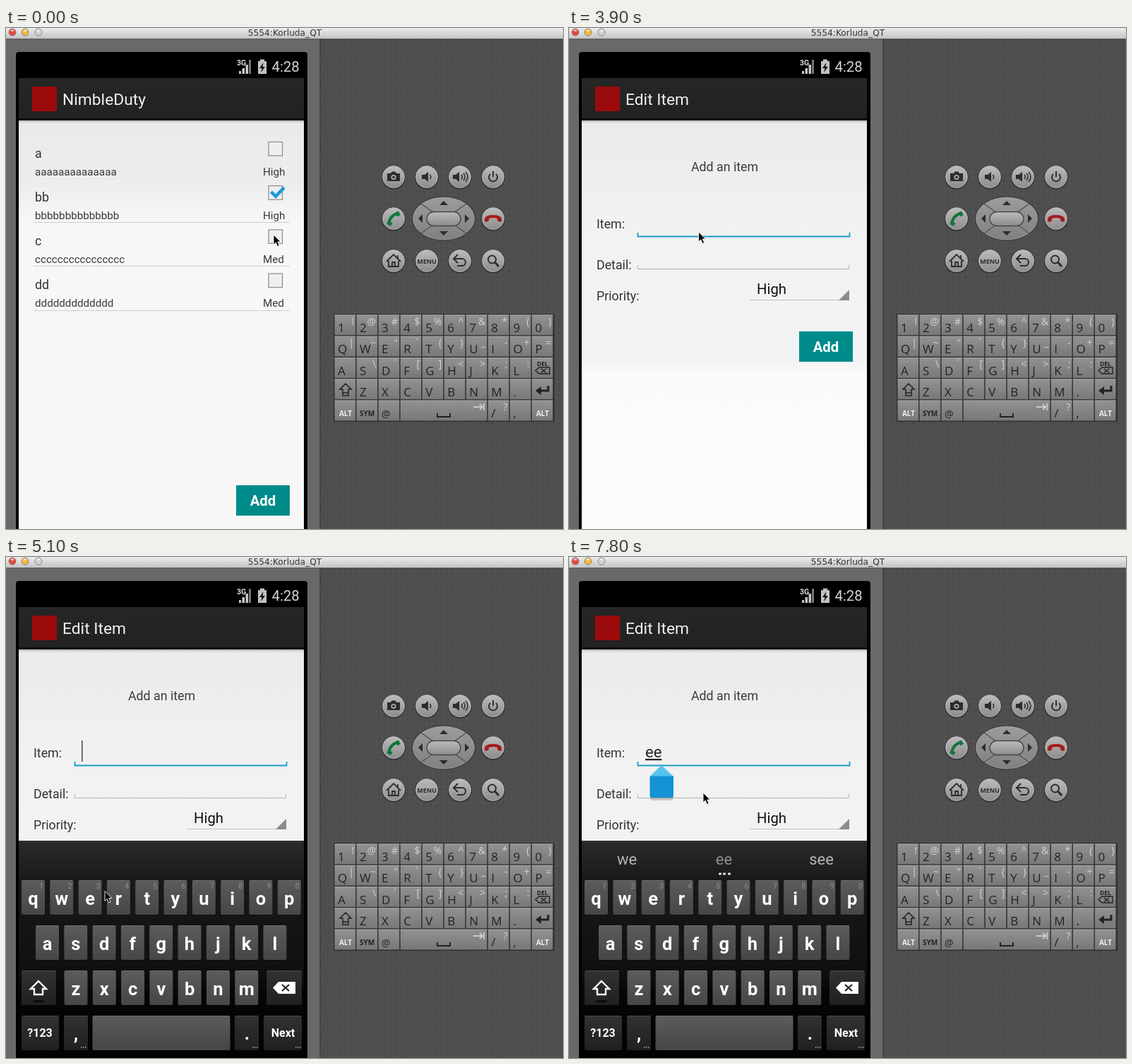
These frames come from a looping animation (789 by 710 pixels, 8000 ms). An HTML page:

```html
<!DOCTYPE html>
<html lang="en">
<head>
<meta charset="utf-8">
<title>To-do app in an emulator</title>
<style>
html, body { margin: 0; width: 100%; height: 100%; overflow: hidden; background: #4e4e4e; }
svg { display: block; width: 789px; height: 710px; font-family: Roboto, sans-serif; }
text { white-space: pre; }
</style>
</head>
<body>
<svg id="stage" viewBox="0 0 789 710" xmlns="http://www.w3.org/2000/svg"></svg>
<script>
const LOOP = 8000, STEP = 150;

// Drawing helpers
const rect = (x, y, w, h, fill, more = '') =>
  `<rect x="${x}" y="${y}" width="${w}" height="${h}" fill="${fill}" ${more}/>`;
const path = (d, fill, more = '') => `<path d="${d}" fill="${fill}" ${more}/>`;
const line = (d, color, w = 1, more = '') =>
  path(d, 'none', `stroke="${color}" stroke-width="${w}" ${more}`);
const circle = (x, y, r, fill, more = '') =>
  `<circle cx="${x}" cy="${y}" r="${r}" fill="${fill}" ${more}/>`;
const text = (x, y, s, size, fill, more = '') =>
  `<text x="${x}" y="${y}" font-size="${size}" fill="${fill}" ${more}>${s.replace(/&/g, '&amp;').replace(/</g, '&lt;')}</text>`;
const group = (id, body, more = '') => `<g id="${id}" ${more}>${body}</g>`;
const at = (x, y, body) => `<g transform="translate(${x} ${y})">${body}</g>`;
const gradient = (id, ...stops) =>
  `<linearGradient id="${id}" x2="0" y2="1">${stops.map(([o, c]) =>
    `<stop offset="${o}" stop-color="${c}"/>`).join('')}</linearGradient>`;
const MID = 'text-anchor="middle"';
const BOLD = 'font-weight="700"';
const SANS = 'font-family="Open Sans, sans-serif"';

const defs = `<defs>
  ${gradient('titleFill', [0, '#ececec'], [1, '#c4c4c4'])}
  ${gradient('barFill', [0, '#262626'], [1, '#222'])}
  ${gradient('listFill', [0, '#eaeaea'], [.16, '#ededed'], [.22, '#f5f5f5'], [.26, '#f7f7f7'], [1, '#f7f7f7'])}
  ${gradient('formFill', [0, '#ebebeb'], [.16, '#eee'], [.21, '#f1f1f1'], [.59, '#f3f3f3'], [.62, '#fafafa'], [1, '#fcfcfc'])}
  ${gradient('shadeFill', [0, '#bbb'], [1, '#ebebeb'])}
  ${gradient('boardFill', [0, '#2b2b2b'], [.17, '#181818'], [.5, '#111'], [.62, '#060606'], [1, '#000'])}
  ${gradient('keyFill', [0, '#5c5c5c'], [1, '#464646'])}
  ${gradient('darkKeyFill', [0, '#323232'], [1, '#202020'])}
  ${gradient('litKeyFill', [0, '#7a7a7a'], [1, '#9a9a9a'])}
  ${gradient('popupFill', [0, '#888'], [1, '#717171'])}
  ${gradient('knobFill', [0, '#bcbcbc'], [1, '#8c8c8c'])}
  ${gradient('padFill', [0, '#9c9c9c'], [1, '#808080'])}
  ${gradient('hardKeyFill', [0, '#929292'], [1, '#787878'])}
  <pattern id="weave" width="8" height="8" patternUnits="userSpaceOnUse">
    ${rect(0, 0, 8, 8, '#4f4f4f')}${line('M0 .5H8M.5 0V8', '#4b4b4b')}${line('M4.5 0V8M0 4.5H8', '#515151')}
  </pattern>
  <clipPath id="screen"><rect x="18" y="71" width="404" height="639"/></clipPath>
</defs>`;

function desktop() {
  const lights = [['#e8473c', 9], ['#f3b73c', 27], ['#d2d2d2', 46]].map(([c, x]) =>
    circle(x, 6, 5, c, 'stroke="#777" stroke-width=".8"') +
    `<ellipse cx="${x}" cy="3.6" rx="2.6" ry="1.5" fill="#fff" opacity=".6"/>`).join('');
  return rect(0, 0, 789, 710, '#696969') + rect(445, 15, 344, 695, 'url(#weave)') +
    rect(444, 15, 2, 695, '#444') +
    rect(0, 0, 789, 15, 'url(#titleFill)') + rect(0, 15, 789, 1, '#5a5a5a') + lights +
    text(395, 10.5, '5554:Korluda_QT', 12.2, '#333', `${MID} font-family="DejaVu Sans, sans-serif"`);
}

function phone() {
  return path('M14 710V38q0-4 4-4H423q4 0 4 4V710Z', '#000') +
    text(327, 53, '3G', 10.5, '#ddd', BOLD) +
    path('M330 65V61H333V65ZM334.5 65V57H338V65ZM339.5 65V52H343V65Z', '#c8c8c8') +
    path('M344 65V45H347V65Z', '#777') +
    path('M357 47H360V44.5H366V47H369V65H357Z', '#c2c2c2') +
    path('M364.5 49L359 57H362.5L361 63L367 55H363.5Z', '#111') +
    text(376.5, 62, '4:28', 20.3, '#d6d6d6');
}

const actionBar = title =>
  rect(18, 71, 404, 60, 'url(#barFill)') + rect(18, 128, 404, 3, '#0d0d0d') + rect(18, 131, 404, 4, 'url(#shadeFill)') +
  rect(37, 83, 35, 35, '#9c0b0b') + text(80, 109, title, 22.8, '#f0f0f0');

const addButton = y => rect(326, y, 76, 43, '#008b8b') +
  text(364, y + 29, 'Add', 20.3, '#fff', `${MID} ${BOLD}`);

function listScreen() {
  const check = y => line(`M375.5 ${y + 9}L382 ${y + 15.5}L394 ${y + 3}`, '#1f9cd6', 4.6);
  const rows = [['a', 14, 'High'], ['bb', 14, 'High'], ['c', 16, 'Med'], ['dd', 13, 'Med']];
  const body = rows.map(([name, n, level], i) => {
    const y = 161 + i * 62.2;
    const mark = i == 1 ? check(y) : i == 2 ? group('check', check(y)) : '';
    return text(41, y + 22.5, name, 17.8, '#333') + text(41, y + 47.5, name[0].repeat(n), 15.2, '#3a3a3a') +
      text(364, y + 47.5, level, 15.2, '#3a3a3a') +
      (i == 2 ? rect(362, 276, 40, 40, '#33b5e5', 'id="press" rx="2" opacity=".35"') : '') +
      rect(372, y + .5, 19.5, 19.5, '#efefef', 'stroke="#8a8a8a" stroke-width="1.2"') + mark +
      (i ? rect(39, Math.round(y + 52), 363, 1, '#cfcfcf') : '');
  }).join('');
  return rect(18, 131, 404, 579, 'url(#listFill)') + actionBar('NimbleDuty') + body + addButton(648);
}

function formScreen() {
  return rect(18, 131, 404, 579, 'url(#formFill)') + actionBar('Edit Item') +
    text(220.5, 203, 'Add an item', 17.8, '#3a3a3a', MID) +
    text(39, 284, 'Item:', 17.8, '#333') + text(39, 342, 'Detail:', 17.8, '#333') +
    text(39, 386, 'Priority:', 17.8, '#333') +
    line('M97.5 290V295.5H397.5V290', '#1b9ccb', 1.8) +
    line('M97.5 336V341.5H396.5V336', '#b4b4b4') +
    text(266, 377, 'High', 20.3, '#111') + rect(256, 385, 141, 1, '#c0c0c0') +
    path('M397 371V386H382Z', '#8c8c8c') + addButton(430) +
    text(108, 284, '', 22, '#222', 'id="typed" text-decoration="underline"') +
    rect(107, 260, 1.5, 30, '#444', 'id="caret"') +
    group('handle', path('M131 295L147.5 311V340q0 3-3 3H118q-3 0-3-3V311Z', '#000', 'opacity=".18" transform="translate(0 2)"') +
      path('M131 295L148 311H114.5Z', '#56c5ee') +
      path('M114.5 310.5H148V338q0 3-3 3H117.5q-3 0-3-3Z', '#1592d5'));
}

const CAP = 33, PITCH = 40.3;

function softKeyboard() {
  const cap = (x, y, w, fill) => rect(x, y + 1, w, 49, '#000', 'rx="2" opacity=".6"') +
    rect(x, y, w, 49, `url(#${fill})`, 'rx="2"') + rect(x + 1, y, w - 2, 1, '#fff', 'opacity=".13"');
  const row = (letters, x, y) => [...letters].map((c, i) => {
    const kx = x + i * PITCH;
    return cap(kx, y, CAP, 'keyFill') + (c == 'e' ? group('lit', cap(kx, y, CAP, 'litKeyFill')) : '') +
      (y < 500 ? text(kx + 31, y + 11.5, `${(i + 1) % 10}`, 10.5, '#909090', 'text-anchor="end"') : '') +
      text(kx + CAP / 2, y + 35, c, 25.5, '#fff', `${MID} ${BOLD}`);
  }).join('');
  const more = (x, y) => [0, 3, 6].map(d => rect(x + d, y, 1.5, 1.5, '#aaa')).join('');
  const label = (x, y, s, size) => text(x, y, s, size, '#fff', `${MID} ${BOLD}`);
  const words = [82, 219.5, 357.5].map((x, i) =>
    text(x, 436, '', 22, i == 1 ? '#8f8f8f' : '#b5b5b5', `class="word" ${MID}`)).join('');
  return rect(18, 402, 404, 350, 'url(#boardFill)') + rect(18, 402, 404, 1, '#3a3a3a') +
    group('words', words + [212, 218, 225].map(x => rect(x, 447.5, 4, 3, '#e4e4e4', 'rx="1"')).join('')) +
    row('qwertyuiop', 22, 458) + row('asdfghjkl', 42, 522) +
    cap(22, 586, 49, 'darkKeyFill') + row('zxcvbnm', 82.5, 586) + cap(369, 586, 50, 'darkKeyFill') +
    line('M46 601L57 612H52V620H40V612H35Z', '#fff', 2.4) + rect(39, 628, 15, 3, '#0a0a0a') +
    path('M378 610.5L386 602H410V619H386Z', '#fff') + line('M391 606L401 615M401 606L391 615', '#222', 2.2) +
    cap(22, 650, 53, 'darkKeyFill') + cap(82, 650, 34, 'darkKeyFill') + cap(122.5, 650, 195, 'keyFill') +
    cap(324, 650, 34, 'darkKeyFill') + cap(365, 650, 54, 'darkKeyFill') +
    label(48, 680, '?123', 16) + label(99, 684, ',', 25) + label(341.5, 684, '.', 25) + label(392.5, 680, 'Next', 16) +
    more(106, 694) + more(349, 694) + more(410, 694) +
    group('popup', path('M92 370H147q3 0 3 3V441q0 3-3 5L125 459q-5 3-10 0L92 446q-3-2-3-5V373q0-3 3-3Z', 'url(#popupFill)', 'stroke="#666" stroke-width=".8"') +
      label(119.5, 419, 'e', 35) + [132, 138, 144].map(x => rect(x, 437.5, 2, 2, '#ccc')).join(''));
}

function hardButtons() {
  const ink = '#2c2c2c';
  const horn = path('M-7-3H-3L2-7V7L-3 3H-7Z', ink);
  const icons = [
    [549, 211, path('M-9-5H-4L-2.5-7.5H2.5L4-5H9V6H-9Z', ink) + circle(0, .5, 3.6, '#aaa') + circle(0, .5, 1.8, ink)],
    [596, 211, horn + line('M4.5-3q2.5 3 0 6', ink, 1.5)],
    [643, 211, at(-3, 0, horn) + line('M2-3q2.5 3 0 6M5-5q4 5 0 10M8-7q6 7 0 14', ink, 1.5)],
    [690, 211, line('M-4-4A6 6 0 1 0 4-4M0-8V0', ink, 2)],
    [549, 270, line('M-7 9Q-6-5 8-8', '#12763a', 4) + line('M-8 5L-3 9M4-9L8-4', '#12763a', 5)],
    [690, 270, path('M-12 4V0Q-10-5 0-5T12 0V4Q9 6 6 3V0Q0-2-6 0V3Q-9 6-12 4Z', '#a61b1b')],
    [549, 330, line('M-10 1L0-9L10 1M-7 0V8H7V0M-2 8V2H2V8M6-8V-4', ink, 1.8)],
    [596, 330, text(0, 3.6, 'MENU', 9, ink, `${MID} ${BOLD} ${SANS}`)],
    [643, 330, line('M-8-3H3a5 5 0 0 1 0 10H-4M-3-9L-9-3L-3 3', ink, 2)],
    [690, 330, circle(-1.5, -2, 5.5, 'none', `stroke="${ink}" stroke-width="2"`) + line('M2.5 2L8 8', ink, 3)]
  ];
  const pad = `<ellipse cx="620" cy="270" rx="45" ry="31.5" fill="#333"/>
    <ellipse cx="620" cy="270" rx="43.5" ry="30" fill="url(#padFill)" stroke="#aaa" stroke-width=".8"/>` +
    line('M588 249L606 262M652 249L634 262M588 291L606 278M652 291L634 278', '#555', 1.5) +
    rect(596, 260.5, 48, 20, 'url(#knobFill)', 'rx="10" stroke="#444" stroke-width="1.3"') +
    path('M614 251L620 245L626 251ZM614 288L620 294L626 288ZM590 264V276L584 270ZM650 264V276L656 270Z', ink);
  return pad + icons.map(([x, y, icon]) => at(x, y,
    circle(0, .8, 17, '#353535') + circle(0, 0, 15.5, 'url(#knobFill)', 'stroke="#cacaca" stroke-width=".7"') + icon)).join('');
}

function hardKeyboard() {
  const rows = ['1234567890', 'QWERTYUIOP', 'ASDFGHJKL ', ' ZXCVBNM. ', '  @    /, '];
  const alts = ['!@#$%^&*()', '|~"`{}_-+=', ' \\\u00b4[]<>;: ', '', '       ?  '];
  const W = 31.05, H = 30.3, ink = '#222';
  let out = rect(464, 405, 313, 153, '#303030');
  rows.forEach((r, j) => [...r].forEach((c, i) => {
    if (j == 4 && i > 3 && i < 7) return;
    const x = 465.5 + i * W, y = 406.5 + j * H, w = (j == 4 && i == 3 ? 4 : 1) * W - 1.5;
    out += rect(x, y, w, H - 1.5, 'url(#hardKeyFill)') + rect(x, y, w, 1, '#aaa') +
      text(x + 4.5, y + 24.5, c, c == '@' ? 14 : 17, ink, SANS) +
      text(x + 27.5, y + 14, alts[j][i] || '', 14, '#d2d2d2', `text-anchor="end" ${SANS}`);
  }));
  const small = (x, y, s, fill, size) => text(x, y, s, size, fill, `${MID} ${BOLD} ${SANS}`);
  return out + small(760, 479, 'DEL', ink, 8.5) + small(481, 550, 'ALT', '#eee', 10) +
    small(511.5, 550, 'SYM', ink, 10) + small(760, 550, 'ALT', '#eee', 10) +
    line('M750 485.5L755 481H770V490H755ZM758 483L765 488.5M765 483L758 488.5', ink, 1.4) +
    line('M481 504L489 512H485V521H477V512H473ZM477 517H485', ink, 1.5) +
    line('M768 507V514H754', ink, 3) + path('M750 514L758 508V520Z', ink) +
    line('M611 546V551H629V546', ink, 2) + line('M662 537H675M671 533L675 537L671 541M677 532V542', '#e0e0e0', 1.4);
}

const stage = document.getElementById('stage');
stage.innerHTML = defs + desktop() + phone() +
  group('app', group('list', listScreen()) + rect(18, 71, 404, 639, '#000', 'id="dim" opacity=".045"') +
    group('form', formScreen()) + group('keys', softKeyboard()), 'clip-path="url(#screen)"') +
  hardButtons() + hardKeyboard() +
  group('mouse', path('M0 0V14L3.2 11L5.6 16.5L8.2 15.4L5.8 10H10Z', '#000', 'stroke="#fff" stroke-width=".9"'));

// Timelines: time, then values
const mousePath = [
  [0, 379, 293], [1050, 379, 293], [1200, 368, 315], [1350, 350, 385], [1500, 335.5, 460], [1650, 335.5, 460],
  [1800, 346, 578], [1950, 354, 628], [2100, 368, 670], [2400, 368, 670], [2700, 340, 594], [3000, 276, 420],
  [3300, 230, 320], [3600, 203, 298], [3900, 183.5, 289], [4350, 183.5, 289], [4650, 181, 343],
  [4950, 156, 465], [5250, 124, 482], [5400, 118, 482], [6300, 118, 482], [6450, 128, 440], [6600, 150, 370],
  [6750, 168, 318], [7050, 140, 283], [7350, 142, 286], [7800, 190, 334]
];
const openPath = [[3150, 0], [3300, .45], [3450, .86], [3600, 1]];
const keysPath = [[4650, 0], [4800, .5], [4950, .88], [5100, 1]];
const caretOn = [[3150, 3600], [4050, 4500], [5100, 5550], [6000, 6900], [7200, 7650]];

function sample(track, t) {
  const i = track.findIndex(k => k[0] > t);
  if (i == 0) return track[0].slice(1);
  if (i < 0) return track[track.length - 1].slice(1);
  const a = track[i - 1], b = track[i], f = (t - a[0]) / (b[0] - a[0]);
  return a.slice(1).map((v, n) => v + (b[n + 1] - v) * f);
}

const el = id => document.getElementById(id);
const set = (id, name, value) => el(id).setAttribute(name, value);
const show = (id, on) => set(id, 'visibility', on ? 'visible' : 'hidden');
const words = [...document.querySelectorAll('.word')];

function draw(time) {
  const t = Math.floor(time / STEP) * STEP;
  set('mouse', 'transform', `translate(${sample(mousePath, t).join(' ')})`);
  show('press', t == 1050);
  show('check', t >= 1200);

  const [open] = sample(openPath, t);
  show('dim', open > 0);
  set('form', 'opacity', open);
  set('form', 'transform', `translate(220 380) scale(${.8 + .2 * open}) translate(-220 -380)`);

  const [up] = sample(keysPath, t);
  set('keys', 'opacity', up);
  set('keys', 'transform', `translate(0 ${33 * (1 - up)})`);

  const typed = t < 6000 ? '' : t < 6300 ? 'e' : 'ee';
  const pressed = t == 5850 || t == 6150;
  el('typed').textContent = typed;
  set('caret', 'x', 107 + 12 * typed.length);
  show('caret', caretOn.some(([from, to]) => t >= from && t < to));
  show('handle', t >= 7200);
  show('popup', pressed);
  show('lit', pressed);
  show('words', typed);
  const hints = typed == 'e' ? ['w', 'e', 'r'] : ['we', 'ee', 'see'];
  words.forEach((w, i) => w.textContent = hints[i]);
}

const start = performance.now();
function tick() {
  draw((performance.now() - start) % LOOP);
  requestAnimationFrame(tick);
}
tick();
</script>
</body>
</html>
```
